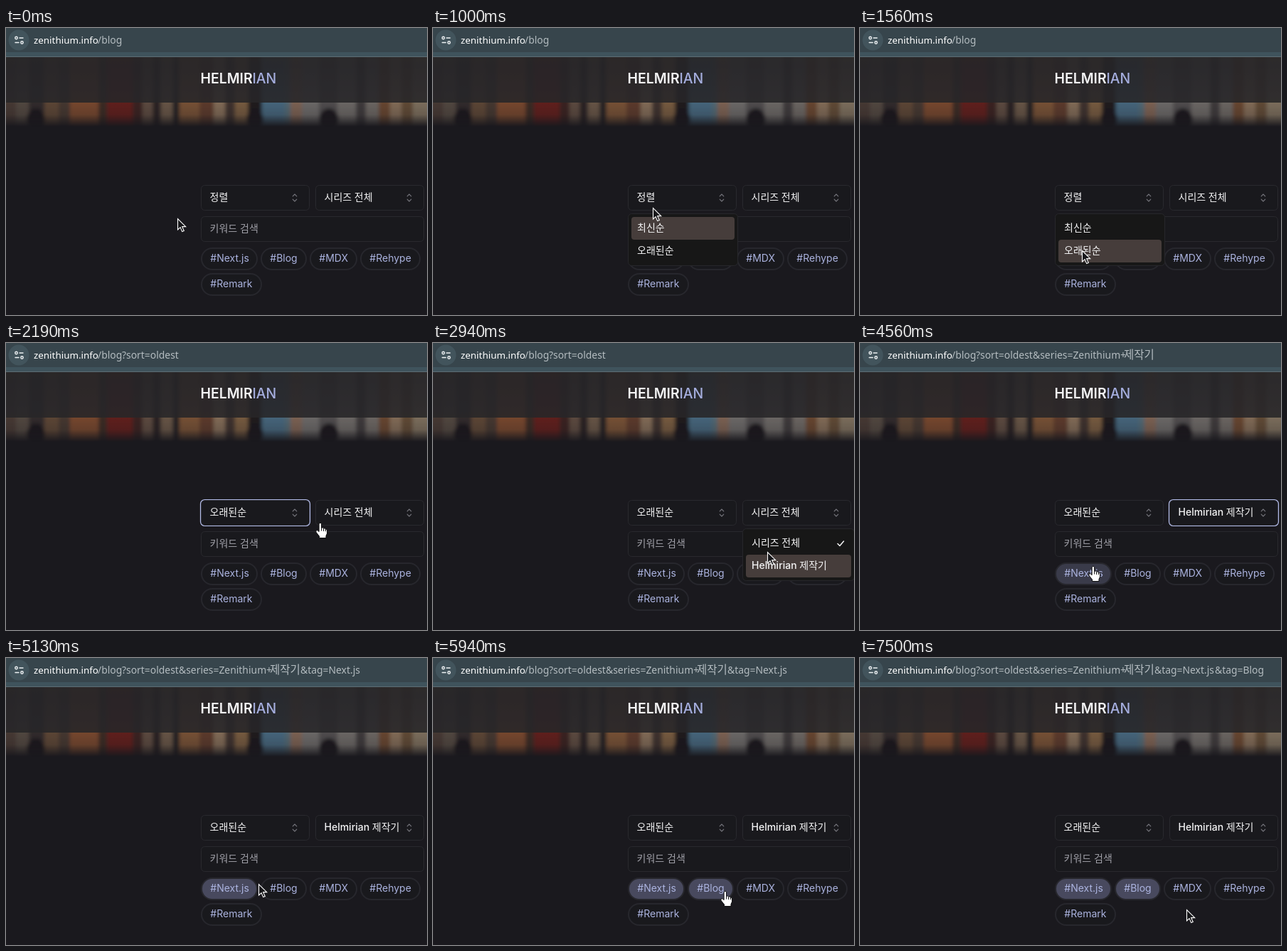
An HTML page for the animation above (7.56 s loop, 592 by 404 pixels).

```html
<!DOCTYPE html>
<html lang="ko">
<head>
<meta charset="utf-8">
<title>Blog filters</title>
<style>
  html, body { margin: 0; width: 100%; height: 100%; overflow: hidden; background: #1a191e; }
  svg { display: block; width: 592px; height: 404px; }
  text { font: 500 14px Inter, "Noto Sans CJK KR", sans-serif; fill: #f4f4f5; white-space: pre; }
  .url text { font: 400 13.9px "Noto Sans", "Noto Sans CJK KR", sans-serif; fill: #b4bcc0; }
  .url .host { font-size: 13.4px; fill: #fff; }
  .url .hangul { font-size: 15.5px; }
  .title { font-size: 19.4px; font-weight: 600; }
  .accent { fill: #a5aede; font-weight: 500; }
  .tag { font-weight: 400; fill: #abb3df; }
  .hint { font-weight: 400; fill: #a0a0a8; }
  .line { fill: none; stroke-linecap: round; stroke-linejoin: round; }
</style>
</head>
<body>
<svg id="stage" viewBox="0 0 592 404">
  <defs>
    <filter id="soft" filterUnits="userSpaceOnUse" x="-20" y="20" width="632" height="140">
      <feGaussianBlur stdDeviation="2.5"/>
    </filter>
    <linearGradient id="fade" x2="0" y2="1">
      <stop stop-color="#fff" stop-opacity=".68"/>
      <stop offset=".5" stop-color="#fff" stop-opacity=".56"/>
      <stop offset=".8" stop-color="#fff" stop-opacity=".22"/>
      <stop offset="1" stop-color="#fff" stop-opacity="0"/>
    </linearGradient>
    <linearGradient id="rise" x2="0" y2="1">
      <stop stop-color="#fff" stop-opacity=".05"/>
      <stop offset="1" stop-color="#fff" stop-opacity=".08"/>
    </linearGradient>
    <mask id="fadeMask" maskUnits="userSpaceOnUse" x="0" y="105" width="592" height="34">
      <rect y="105" width="592" height="34" fill="url(#fade)"/>
    </mask>
    <mask id="riseMask" maskUnits="userSpaceOnUse" x="0" y="41" width="592" height="64">
      <rect y="41" width="592" height="64" fill="url(#rise)"/>
    </mask>
    <g id="books" filter="url(#soft)"></g>
  </defs>
  <rect width="592" height="404" fill="#1a191e"/>

  <rect y="41" width="592" height="64" fill="#262528"/>
  <g mask="url(#riseMask)"><use href="#books"/></g>
  <g mask="url(#fadeMask)"><use href="#books"/></g>

  <rect width="592" height="41" fill="#3f535c"/>
  <rect width="592" height="34" fill="#37454c"/>
  <rect y="40" width="592" height="1" fill="#5d6c73"/>
  <circle cx="18" cy="17" r="14.5" fill="#42545c"/>
  <g class="line" stroke="#eef2f4" stroke-width="1.4">
    <circle cx="14.5" cy="14" r="1.7"/><path d="M19 14h5M13 20.5h5"/><circle cx="22.5" cy="20.5" r="1.7"/>
  </g>
  <g class="url" id="url"></g>
  <text class="title" x="273.5" y="78">HELMIR<tspan class="accent">IAN</tspan></text>
  <g id="page"></g>
  <g id="cursor"></g>
</svg>
<script>
const LOOP = 7560;
const $ = id => document.getElementById(id);

function add(parent, name, attrs, text) {
  const node = document.createElementNS('http://www.w3.org/2000/svg', name);
  for (const key in attrs) node.setAttribute(key, attrs[key]);
  if (text) node.textContent = text;
  return parent.appendChild(node);
}
const show = (node, on) => node.setAttribute('visibility', on ? 'visible' : 'hidden');
const box = (parent, x, y, width, height, rx, style) =>
  add(parent, 'rect', { x, y, width, height, rx, ...style });
const label = (parent, x, y, text, cls = '') => add(parent, 'text', { x, y, class: cls }, text);

// Blurred bookshelf behind the header: left edge and colour of each spine
const shelf = `-10 5a473c 14 6b5b50 32 3a3030 54 7a5a40 74 584438 90 a05c36 130 4a3028 142 80241c
  178 4a2820 192 7a6050 206 302825 218 8a7058 234 2a2628 244 a06a40 272 7a4a30 292 b09070
  308 503c34 322 a07850 340 201c1c 360 5a88a6 392 6a8a98 400 a8826a 416 908c88 440 686464
  466 908a84 492 504a48 506 908880 524 8a5a38 540 b09070 556 806040 572 a89478`.split(/\s+/);
for (let i = 0; i < shelf.length; i += 2)
  box($('books'), shelf[i], 30, (shelf[i + 2] ?? 610) - shelf[i], 120, 0, { fill: '#' + shelf[i + 1] });
for (const [cx, rx] of [[42, 13], [350, 12], [454, 14]])
  add($('books'), 'ellipse', { cx, cy: 130, rx, ry: 17, fill: '#1c191b' });

// Address parts: x, text, time shown, class
const address = [
  [39, 'zenithium.info', 0, 'host'],
  [129, '/blog', 0],
  [163, '?sort=oldest', 1850],
  [243, '&series=Zenithium+', 3600],
  [371, '제작기', 3600, 'hangul'],
  [414, '&tag=Next.js', 4950],
  [499, '&tag=Blog', 6000]
].map(([x, text, from, cls]) => ({ from, node: label($('url'), x, 22, text, cls) }));

const page = $('page');
const border = { fill: '#19191d', stroke: '#29292e' };
function makeSelect(x) {
  box(page, x + .5, 221.5, 152, 35, 5, border);
  const ring = box(page, x - .5, 220.5, 154, 37, 6, { fill: 'none', stroke: '#b4bdea', 'stroke-width': 1.2 });
  add(page, 'path', {
    class: 'line', stroke: '#77777e', 'stroke-width': 1.1,
    d: `M${x + 129.2} 236.8l2.8-2.8 2.8 2.8m-5.6 4.4l2.8 2.8 2.8-2.8`
  });
  return { ring, text: label(page, x + 12.5, 243, '') };
}
const sortSelect = makeSelect(274);
const seriesSelect = makeSelect(435);
box(page, 274.5, 265.5, 313, 35, 5, border);
label(page, 286.5, 287, '키워드 검색', 'hint');

// Tags: x, y, width, name, hover start, selection time
const tags = [
  [274, 309, 80, '#Next.js', 4300, 4700],
  [358, 309, 65, '#Blog', 5250, 5600],
  [427, 309, 67, '#MDX', LOOP, LOOP],
  [498, 309, 85, '#Rehype', LOOP, LOOP],
  [274, 345, 86, '#Remark', LOOP, LOOP]
].map(([x, y, width, name, hover, select]) => {
  const pill = box(page, x + 1, y + 1, width - 2, 30, 15, { stroke: '#27272d', 'stroke-width': 2 });
  label(page, x + 13.3, y + 20, name, 'tag');
  return { pill, hover, select };
});

function makeMenu(x, width, options) {
  const menu = add(page, 'g', {});
  box(menu, x + .5, 261.5, width, 73, 5, { fill: '#171717', stroke: '#27272b' });
  const mark = box(menu, x + 5, 266, width - 9, 32, 4, { fill: '#463d3b' });
  options.forEach((text, i) => label(menu, x + 13, 286 + 32 * i, text));
  return { menu, mark };
}
const sortMenu = makeMenu(274, 154, ['최신순', '오래된순']);
const seriesMenu = makeMenu(435, 157, ['시리즈 전체', 'Helmirian 제작기']);
add(seriesMenu.menu, 'path', {
  class: 'line', stroke: '#f4f4f5', 'stroke-width': 1.5, d: 'M569 282.5l3 3 5.5-6.5'
});

const arrow = add($('cursor'), 'path', {
  d: 'M.5.5V16l3.6-3.4 2.6 6 2.6-1.1-2.6-5.9h5z', fill: '#17171a', stroke: '#fff', 'stroke-width': 1.1
});
const hand = add($('cursor'), 'g', {});
add(hand, 'path', {
  d: 'M-1.9 1.5Q0-1.2 1.6 1.5V7.5Q3.4 6 4.6 8 6.4 7 7.4 9 9.6 8.6 9.6 11V15L8 18.5V21.5H-1.5V19L-6.2 13Q-6.4 10-4 10.6L-1.9 12.6z',
  fill: '#fff', stroke: '#0c0c0e', 'stroke-width': 1, 'stroke-linejoin': 'round'
});
add(hand, 'path', { d: 'M1.6 7.5v4M4.6 8v4M7.4 9v3.2', stroke: '#0c0c0e', fill: 'none' });

// Pointer path: time, x, y
const path = [
  [0, 241, 268], [150, 241, 268], [600, 309, 247], [800, 309, 247], [1000, 309, 253],
  [1350, 312, 313], [1850, 312, 313], [2190, 442, 253], [2450, 490, 246], [2650, 490, 246],
  [2940, 470, 294], [3150, 478, 313], [3800, 478, 313], [4300, 334, 320], [4560, 328, 314],
  [4950, 328, 314], [5400, 405, 326], [5700, 411, 328], [6050, 411, 328], [6450, 459, 354],
  [LOOP, 459, 354]
];
const within = (t, from, to) => t >= from && t < to;

function pointerAt(t) {
  const i = path.findIndex(point => point[0] > t);
  const [t0, x0, y0] = path[i - 1], [t1, x1, y1] = path[i];
  const p = (t - t0) / (t1 - t0), eased = p * p * (3 - 2 * p);
  return [x0 + (x1 - x0) * eased, y0 + (y1 - y0) * eased];
}

function draw(t) {
  address.forEach(part => show(part.node, t >= part.from));

  sortSelect.text.textContent = t < 1650 ? '정렬' : '오래된순';
  seriesSelect.text.textContent = t < 3400 ? '시리즈 전체' : 'Helmirian 제작기';
  show(sortSelect.ring, within(t, 1650, 2600));
  show(seriesSelect.ring, within(t, 3400, 4700));

  const sortOpen = within(t, 750, 1650), seriesOpen = within(t, 2600, 3400);
  show(sortMenu.menu, sortOpen);
  show(seriesMenu.menu, seriesOpen);
  sortMenu.mark.setAttribute('y', t < 1200 ? 266 : 298);
  seriesMenu.mark.setAttribute('y', t < 2900 ? 266 : 298);

  tags.forEach(({ pill, hover, select }) =>
    pill.setAttribute('fill', t >= select ? '#48495e' : t >= hover ? '#3a3b4a' : '#19191d'));

  const [x, y] = pointerAt(t);
  const overSelect = within(y, 221, 257) && (within(x, 274, 427) || within(x, 435, 588));
  const overTag = within(y, 309, 341) &&
    (within(x, 274, 354) || within(x, 358, 423) || within(x, 427, 494) || within(x, 498, 583));
  const clickable = !sortOpen && !seriesOpen && (overSelect || overTag);
  show(hand, clickable);
  show(arrow, !clickable);
  $('cursor').setAttribute('transform', `translate(${Math.round(x)} ${Math.round(y)})`);
}

const start = performance.now();
function tick() {
  draw((performance.now() - start) % LOOP);
  requestAnimationFrame(tick);
}
tick();
</script>
</body>
</html>
```
